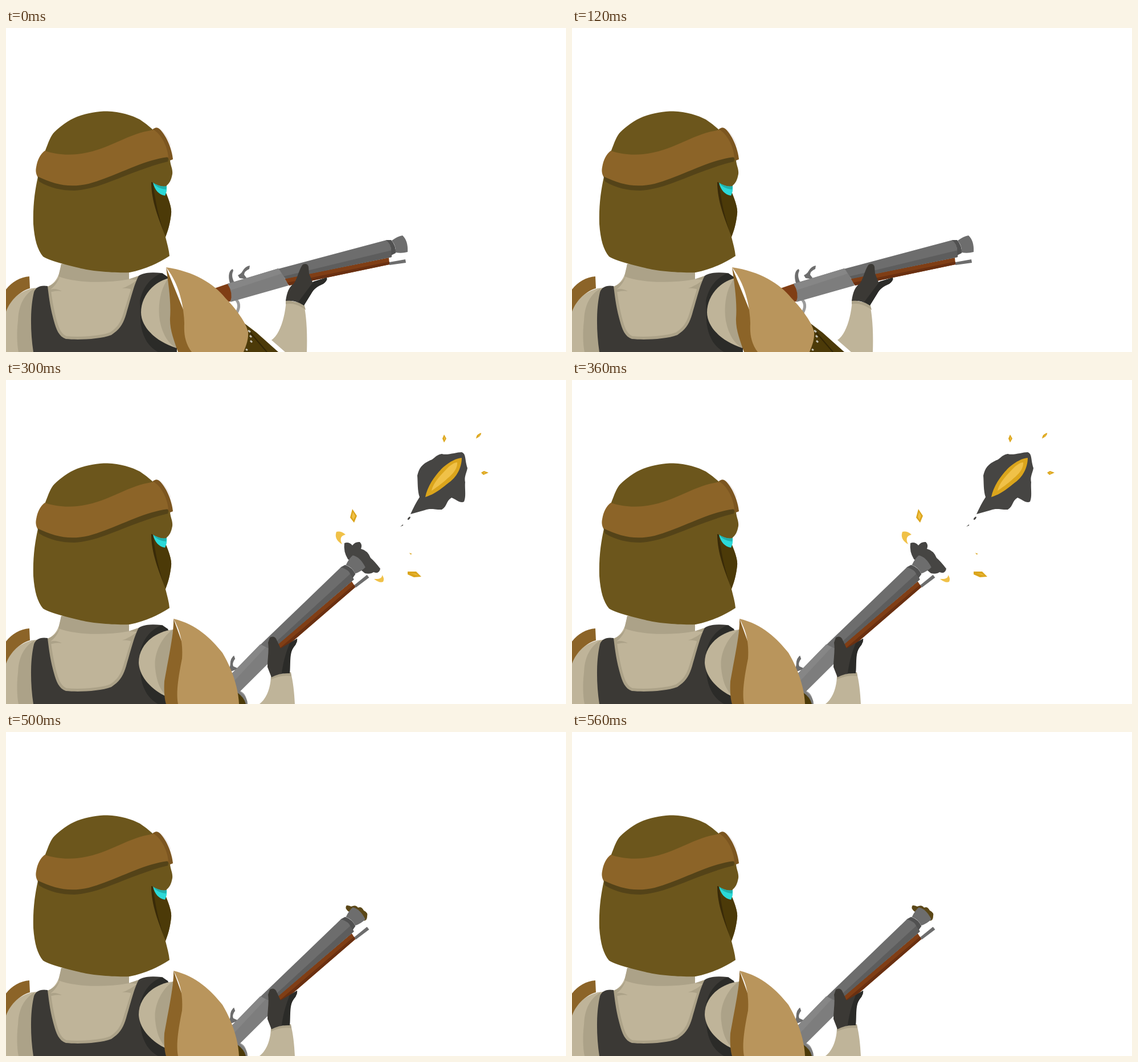
These frames come from a looping animation (983 by 570 pixels, 0.6 s). An HTML page:

```html
<!DOCTYPE html>
<html lang="en">
<head>
<meta charset="utf-8">
<title>Musket shot</title>
<style>
  html, body { margin: 0; width: 100%; height: 100%; overflow: hidden; background: #fff; }
  svg { display: block; }
  .helmet { fill: #6c561c } .band { fill: #8c6428 } .bandShade { fill: #544318 }
  .skin { fill: #bfb499 } .skinShade { fill: #aca288 }
  .vest { fill: #3b3935 } .vestShade { fill: #2b2b28 }
  .pad { fill: #b9955c } .sleeve { fill: #4c3a08 }
  .steel { fill: #6d6d6d } .steelLight { fill: #7d7d7d } .steelDark { fill: #5d5d5d }
  .wood { fill: #803e15 } .woodDark { fill: #6a3011 }
  .flame { fill: #dba51c } .glow { fill: #f0c148 } .smoke { fill: #464543 }
</style>
</head>
<body>
<svg width="983" height="570" viewBox="0 0 983 570">
  <!-- torso -->
  <path class="skin" d="M97 415C95 430 90 448 73 455L45 458C20 465 8 480 0 497V570H280V450L233 436 215 442V425Z"/>
  <path class="skinShade" d="M97 415L92 437C120 448 170 450 216 442V425Z"/>
  <path class="skinShade" d="M216 442L233 436 224 462Q216 457 204 458Q220 452 230 443ZM97 425Q94 447 73 455L74 466Q87 461 98 463Q87 457 78 460Q94 448 97 425Z"/>
  <path class="skinShade" d="M50 458C30 470 22 490 21 515C18 540 20 560 22 570H50Z"/>
  <path class="band" d="M0 460C10 447 25 438 41 437L42 458C25 463 8 478 0 499Z"/>
  <path fill="none" stroke="#aca288" stroke-width="10" d="M73 456C75 470 77 490 84 515C88 530 93 543 105 547C125 549 165 548 185 540C200 530 206 520 211 503L225 458"/>
  <path class="vest" d="M73 454C60 452 52 456 49 465C43 490 42 530 48 570H300V560L240 500 284 438 272 431C255 429 240 431 233 436C225 450 218 480 211 503C206 520 200 530 185 540C165 548 125 549 105 547C93 543 88 530 84 515C77 490 75 470 73 454Z"/>
  <path class="vestShade" d="M274 431L284 438 290 450 240 500 300 560V570H267C248 560 238 540 236 515L235 480C240 455 255 438 274 431Z"/>

  <!-- head -->
  <path class="helmet" d="M68 218C75 200 78 190 85 183C95 173 110 162 125 156C145 149 160 146.500 178 146.500C200 147 222 154 235 161Q250 171 260 181L288 233C289 243 293 248 292 257C290 268 287 273 282 277L281 290C287 305 291 318 290 326C288 345 284 357 280 368C283 380 286 390 287 401C270 412 245 425 217 430C190 431 150 428 128 422C100 415 75 409 65 402C55 390 50 372 48 345C47 310 51 285 56 262Z"/>
  <path class="sleeve" d="M255 271L260 274 281 291C287 305 291 318 290 326C288 345 284 357 280 367C268 335 257 305 255 271Z"/>
  <path fill="#392a08" d="M255 271L258 272C262 305 268 335 280 367C268 335 255 305 255 271Z"/>
  <path fill="#2bd9d8" d="M258 272C265 277 275 280 282 278C283 285 281 291 279 295C268 293 261 285 258 272Z"/>
  <path fill="#20b0ac" d="M258 272C265 277 275 280 282 278L281 284C270 283 263 279 258 272Z"/>
  <path class="bandShade" d="M55 260L58 270C78 282 98 286 120 286C170 283 215 252 284 235L286 226Z"/>
  <path fill="#7c5620" d="M257 179Q264 172 270 178C282 190 291 212 293 231L288 233 282 226Z"/>
  <path class="band" d="M68 216C85 222 105 224 125 222C175 217 210 188 250 181L259 179C270 185 283 205 285 227C240 232 195 260 145 274C110 282 85 275 55 261C52 255 52 250 53 245C55 232 60 222 68 216Z"/>
  <path fill="none" stroke="#e3dcda" d="M274 181Q284 192 289 207"/>

  <!-- muzzle smoke, behind the barrel -->
  <path class="smoke" data-step="2" d="M594 287Q602 284 608 291Q613 284 621 285Q626 290 623 297Q635 300 640 313Q648 320 657 332Q655 342 645 338Q640 342 630 340L600 315Q592 302 594 287Z"/>
  <path class="smoke" data-step="3" d="M593 298Q600 296 606 300Q612 293 617 296Q619 304 627 308Q634 312 630 318Q640 316 638 324Q636 330 638 336Q632 339 625 335L605 314Q594 308 593 298Z"/>
  <path fill="#5b4717" data-step="4" d="M600 315Q594 309 598 305Q602 305 606 307Q614 303 618 309Q624 306 628 314Q636 318 634 324Q634 331 629 332Z"/>

  <g id="gun">
    <path class="wood" d="M366 458L392 449 400 465 394 481 384 483Z"/>
    <path class="steel" d="M393 449C389 435 392 426 398 424L399 427C395 435 398 442 401 448ZM407 435Q413 432 415 428Q420 419 428 418L427 424Q418 428 418 434L424 442 410 440Z"/>
    <path fill="none" stroke="#9b9b9b" stroke-width="5" d="M403 477Q413 486 405 501"/>
    <path class="wood" d="M488 441L672 404 673 416 497 453Z"/>
    <path class="woodDark" d="M493 448L673 411V416L497 453Z"/>
    <path class="steel" d="M673 412L701 407 702 413 673 417ZM477 424L668 373Q678 382 677 403L490 441Z"/>
    <path class="steelDark" d="M487 437L677 391V403L492 441Z"/>
    <path class="steelLight" d="M389 450L478 423Q488 436 496 453L394 482Q399 466 389 450Z"/>
    <path fill="#868686" d="M389 450L478 423 484 432 395 461Z"/>
    <path fill="#515151" d="M667 373L676 373Q685 383 684 396L676 400Q678 382 667 373Z"/>
    <path class="steel" d="M677 374Q688 366 696 365Q706 374 705 394Q695 397 684 395Q685 383 677 374Z"/>
  </g>

  <g data-step="0">
    <path class="skin" d="M492 478C490 510 480 540 466 549L490 570H528C529 540 528 510 523 487Z"/>
    <path class="skinShade" d="M491 478L523 485 526 496Q508 482 491 486Z"/>
    <path class="vest" d="M521 416Q529 413 531 420L532 432 538 447 563 439Q565 444 557 450C545 455 540 460 536 467L523 488Q508 478 491 480C493 465 497 455 505 450C512 440 514 425 521 416Z"/>
    <path class="vestShade" d="M540 446L563 439Q565 444 557 450C545 455 540 460 536 467L523 488 513 482Z"/>
    <path class="sleeve" d="M419 520L440 536 478 570H410Z"/>
    <path fill="none" stroke="#332605" stroke-width="2" d="M428 535L458 570"/>
    <path fill="none" stroke="#c4c0b4" stroke-width="3" d="M425 532l4 3M428 541l3 3M429 550l3 3M421 565l3 2"/>
    <path class="skin" d="M286 440C255 448 237 475 237 500C237 525 260 550 299 563Z"/>
    <path class="skinShade" d="M285 440C270 460 266 490 270 515C275 540 285 555 299 563Z"/>
    <path class="band" d="M281 421C285 450 290 480 288 510C287 530 295 550 302 570H330L313 500Z"/>
    <path class="pad" d="M281 421C330 428 365 450 385 475C405 495 422 520 425 535C426 550 420 562 417 570H326C315 555 312 540 313 520C312 480 300 445 281 421Z"/>
  </g>

  <g data-step="1 2 3 4">
    <path class="skin" d="M465 519C465 540 458 560 445 570H507C506 550 504 530 500 516Z"/>
    <path class="skinShade" d="M465 520L500 514 501 521Q483 518 465 527Z"/>
    <path class="vest" d="M463 453Q470 449 474 455L482 472 511 455Q512 462 505 470C498 480 498 490 497 502L498 516Q480 515 466 523L459 505C459 490 462 475 460 462Z"/>
    <path class="vestShade" d="M498 463L511 455Q512 462 505 470C497 480 500 500 498 516H484Q487 490 498 463Z"/>
    <path class="steelLight" d="M405 545Q424 555 424 570H405Z"/>
    <path class="sleeve" d="M406 550Q418 558 421 570H406Z"/>
    <path class="skin" d="M294 439C262 442 233 465 233 497C234 525 260 548 284 558Z"/>
    <path class="skinShade" d="M293 439C270 455 259 485 262 508C264 528 270 545 280 554Z"/>
    <path class="band" d="M294 420C295 445 285 490 278 530C277 545 278 560 281 570H305L312 470Z"/>
    <path class="pad" d="M294 420C335 430 360 455 380 480C395 505 408 540 409 570H302C298 550 303 520 309 490C311 460 305 440 294 420Z"/>
  </g>

  <!-- muzzle flash -->
  <g data-step="1">
    <path class="flame" d="M675 267C673 255 684 235 690 222C700 207 708 200 706 190L712 193C730 175 755 160 773 164C775 180 768 205 755 222C745 230 738 236 734 246L729 242C715 252 690 268 675 267Z"/>
    <path class="glow" d="M691 250C692 235 700 220 712 207C725 192 740 178 758 178C763 190 755 208 742 222L733 238 727 235 715 246 712 243 700 255 698 248Z"/>
    <path class="flame" d="M609 238L625 263 626 270 622 283 619 277 615 292 610 284 603 287 605 267 600 269 607 245ZM673 297Q680 289 688 290L691 298Q682 302 673 297ZM657 323L668 320 667 317 690 321 699 336 668 337 670 332 657 327Z"/>
    <path class="flame" d="M767 123L772 132 771 147 768 146 767 153 764 152V147L759 146 762 128ZM791 145C793 135 800 120 814 115Q817 125 806 137ZM788 170L792 165 808 164V168L794 174Z"/>
    <path class="glow" d="M612 250L621 265 617 280 613 276 607 281 608 262ZM667 324L687 324 694 331 680 332ZM767 128L769 137 766 143 763 138ZM797 140Q800 127 811 120Q812 128 797 140ZM793 169L803 166 797 171Z"/>
  </g>
  <g data-step="2">
    <path class="smoke" d="M710 236C715 225 720 215 726 206C722 195 723 180 722 168C725 155 730 148 745 141C750 140 755 131 765 130C775 133 790 127 800 127C808 130 805 140 810 155C808 165 804 170 806 180C805 190 808 205 804 214C798 218 790 210 782 207C772 213 775 222 765 228C750 228 745 225 735 229ZM705 244Q708 239 710 241Q709 246 705 246ZM692 258L697 254V256Z"/>
    <path class="flame" d="M736 206C740 185 755 165 768 153C780 143 790 138 800 137C800 155 790 172 778 180C765 190 755 200 736 206Z"/>
    <path class="glow" d="M747 195C750 180 765 165 778 152Q788 144 792 145C793 155 785 165 775 173C768 180 757 188 747 195Z"/>
    <path class="flame" d="M769 96L773 103 769 110 766 103ZM825 103Q826 95 834 93Q835 98 825 103ZM834 163L839 160 847 163 838 167ZM608 227L616 239 611 251 604 242ZM705 337L720 337 729 346 716 347 705 342ZM708 304L713 306 710 307Z"/>
    <path class="glow" d="M769 99L771 103 769 107ZM827 101L832 95V97ZM609 232L613 239 610 246 607 241ZM710 340L719 341 724 344ZM837 163L842 162 840 165Z"/>
    <path class="glow" d="M596 272Q588 265 580 267Q575 280 590 289Q583 275 596 272ZM646 350Q656 358 662 355Q665 349 660 343Q661 351 646 350Z"/>
  </g>
  <g data-step="3">
    <path class="smoke" d="M821 71Q825 75 832 71L845 73Q843 80 846 85L854 97Q842 96 840 101Q832 103 828 111Q818 112 808 122Q806 118 812 110L811 98 807 94Q820 88 821 80Z"/>
    <path class="glow" d="M840 77Q840 85 833 90L827 103 823 100 818 101 822 95 818 97Q825 90 827 82Z"/>
    <path fill="none" stroke="#efb63c" stroke-width="2" d="M583 279Q581 268 592 270M652 352Q661 356 661 347"/>
    <path fill="none" stroke="#e5b04a" stroke-width="1.500" d="M837 26l2 2M876 36l2 2M896 85h3M609.500 178v6M804 366l7 1"/>
  </g>
</svg>
<script>
  const STEP = 100, LOOP = 600;
  const gun = document.getElementById("gun");
  const parts = [...document.querySelectorAll("[data-step]")]
    .map(el => ({ el, steps: el.dataset.step.split(" ").map(Number) }));
  const raised = "translate(608 309) rotate(-29) translate(-695 -365)";

  function draw(time) {
    // aim holds for two steps, then recoil and flash last one step each
    const step = Math.max(0, Math.floor(time % LOOP / STEP) - 1);
    gun.setAttribute("transform", step ? raised : "");
    for (const { el, steps } of parts)
      el.style.display = steps.includes(step) ? "" : "none";
  }

  const start = performance.now();
  function tick() {
    draw(performance.now() - start);
    requestAnimationFrame(tick);
  }
  tick();
</script>
</body>
</html>
```
